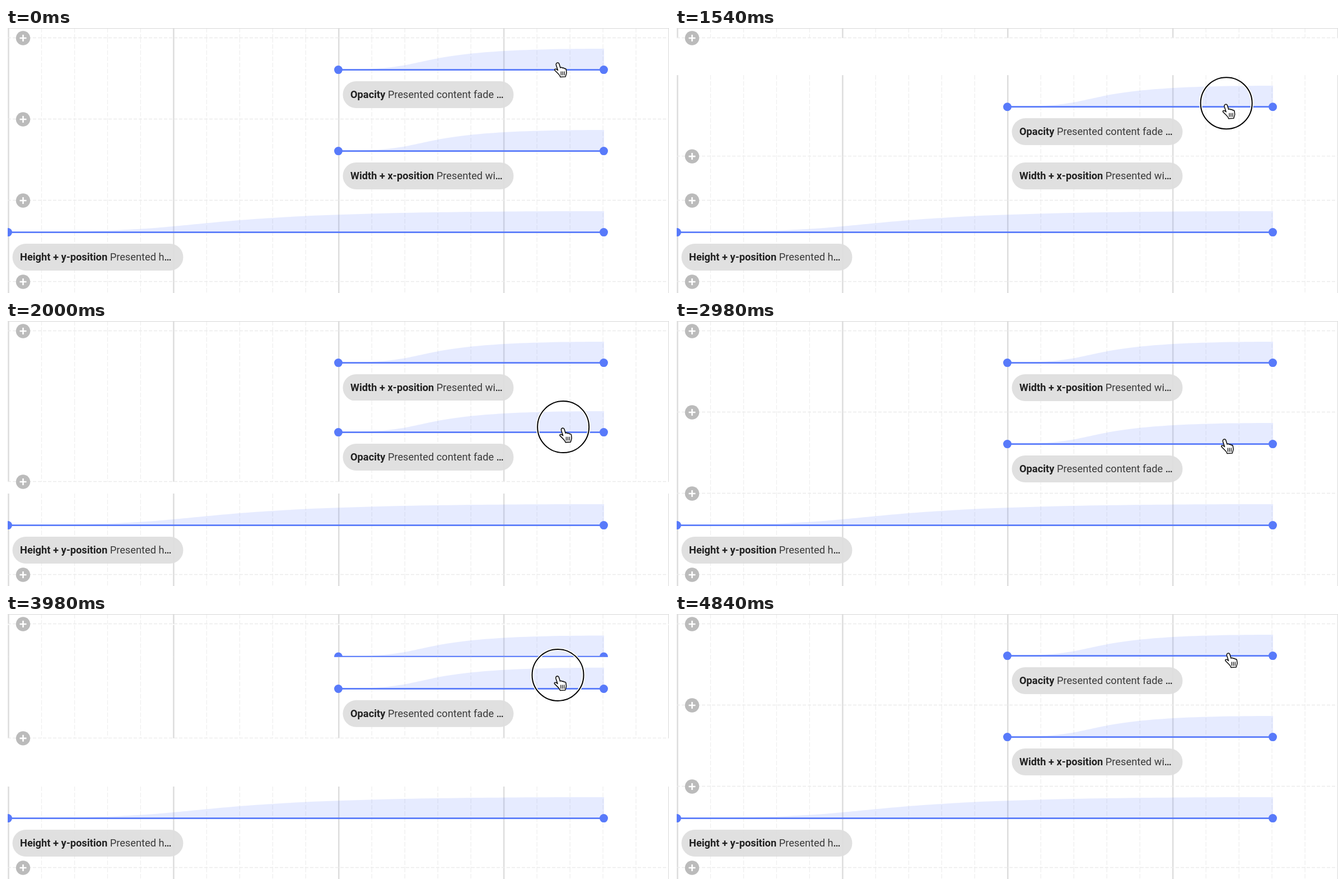
An HTML page for the animation above (6840 ms loop, 1184x473 px).

```html
<!DOCTYPE html>
<html lang="en">
<head>
<meta charset="utf-8">
<title>Reordering timeline rows</title>
<style>
html, body { margin: 0; width: 100%; height: 100%; overflow: hidden; background: #fff; }
svg { display: block; width: 1184px; height: 473px; }
text { font: 400 18.25px Roboto, Arial, sans-serif; fill: #3a3a3a; white-space: pre; }
.title { font-weight: 700; fill: #212121; }
.more { font-weight: 500; fill: #212121; }
.major { stroke: #dedede; stroke-width: 2.6; }
.minor { stroke: #efefef; stroke-width: 1.3; stroke-dasharray: 8 3; }
.rule { stroke: #ebebeb; stroke-width: 1.4; stroke-dasharray: 6 3; }
.pill { fill: #dfdfdff0; }
.area { fill: #5b7cfa; fill-opacity: .15; }
.bar { stroke: #587afa; stroke-width: 2.8; }
.dot { fill: #587afa; }
</style>
</head>
<body>
<svg viewBox="0 0 1184 473" id="stage"></svg>
<script>
const LOOP = 6840, ROW = 145, TOP = 18, END = 1067.5;
const stage = document.getElementById('stage');

function grid(y1, y2) {
  let out = '';
  for (let i = 0; i <= 20; i++) {
    const x = (4.5 + i * 58.98).toFixed(1);
    out += `<line class="${i % 5 ? 'minor' : 'major'}" x1="${x}" x2="${x}" y1="${y1}" y2="${y2}"/>`;
  }
  return out;
}

const divider = y => `
  <line class="rule" x1="3" x2="1184" y1="${y - .5}" y2="${y - .5}"/>
  <circle cx="30.5" cy="${y}" r="12.7" fill="#bbb"/>
  <path d="M24.5 ${y}h12M30.5 ${y - 6}v12" stroke="#fff" stroke-width="2.6"/>`;

// A row is drawn in the top slot and moved by its transform.
function row(id, x, title, detail) {
  const w = END - x, base = 74.6, peak = 37;
  return `<g id="${id}">
    <rect x="3" y="${TOP}" width="1181" height="${ROW}" fill="#fff"/>
    ${grid(TOP, TOP + ROW)}
    <path class="area" d="M${x} ${base}C${x + .42 * w} ${base} ${x + .2 * w} ${peak} ${END + .5} ${peak}V${base}Z"/>
    <line class="bar" x1="${x}" x2="${END}" y1="${base}" y2="${base}"/>
    <circle class="dot" cx="${x}" cy="${base}" r="7.5"/>
    <circle class="dot" cx="${END}" cy="${base}" r="7.5"/>
    <rect class="pill" x="${x + 8}" y="95" width="305" height="48" rx="24"/>
    <text x="${x + 21.5}" y="125"><tspan class="title">${title}</tspan> ${detail}<tspan class="more">…</tspan></text>
    ${divider(TOP + ROW)}
  </g>`;
}

stage.innerHTML = `
  <g>${grid(0, TOP)}${grid(TOP + 3 * ROW, 473)}</g>
  <line x1="3" x2="1184" y1=".5" y2=".5" stroke="#dedede" stroke-width="1.6"/>
  ${row('height', 3.5, 'Height + y-position', 'Presented h')}
  ${row('width', 593.5, 'Width + x-position', 'Presented wi')}
  ${row('opacity', 593.5, 'Opacity', 'Presented content fade ')}
  <g id="head">${divider(TOP)}<rect width="3" height="473" fill="#fff"/></g>
  <g id="pointer">
    <g id="ring" fill="none">
      <circle r="46" stroke="#fff" stroke-width="5"/>
      <circle r="46" stroke="#000" stroke-width="2"/>
    </g>
    <g transform="translate(-7 1)" stroke="#111" stroke-linejoin="round" stroke-linecap="round">
      <path fill="#fff" stroke-width="1.6"
        d="M4 2C6 .2 8 1 8.8 3L11 10Q13.5 8.4 14.5 10.5Q17 9.4 18 11.5Q21 10.8 21.5 14L22 19Q21.8 21 20 26L11 26.5Q10.5 24 6 19.5L1 14.5Q0 11.5 4 12.5L6.5 14.5L3.4 5Q3 3 4 2Z"/>
      <path d="M12.3 17v6m3-6v6m3-6v6" stroke-width="1.3"/>
    </g>
  </g>`;

const [heightRow, widthRow, opacityRow, head, pointer, ring] =
  ['height', 'width', 'opacity', 'head', 'pointer', 'ring'].map(id => document.getElementById(id));

// Progress from 0 to 1, slowing down towards the end.
function ease(t, start, duration) {
  const u = Math.min(1, Math.max(0, (t - start) / duration));
  return 1 - (1 - u) ** 2;
}

const move = (el, x, y) => el.setAttribute('transform', `translate(${x.toFixed(2)} ${y.toFixed(2)})`);
const fade = (t, on, off) => ease(t, on, 120) - ease(t, off, 140);

function draw() {
  const t = performance.now() % LOOP;

  // The hand goes down and back up; the dragged row trails behind it.
  const down = ease(t, 1150, 1341), up = ease(t, 3535, 967);
  const sway = 13 * Math.sin(Math.PI * down ** 6);
  move(pointer, 986 - 4 * down + sway + 7 * up ** 2, 60 + 149 * down - 141 * up);
  ring.setAttribute('opacity', fade(t, 1000, 2480) + fade(t, 3120, 4500));

  const drag = ROW * (ease(t, 1203, 1288) - ease(t, 3604, 1039));
  move(opacityRow, 0, drag);
  move(widthRow, 0, ROW * (1 - ease(t, 1600, 200) + ease(t, 3980, 200)));

  // The dragged row stays on top until it rests in the lower slot.
  const front = drag === ROW ? widthRow : opacityRow;
  if (head.previousElementSibling !== front) stage.insertBefore(front, head);
  requestAnimationFrame(draw);
}

move(heightRow, 0, 2 * ROW);
draw();
</script>
</body>
</html>
```
